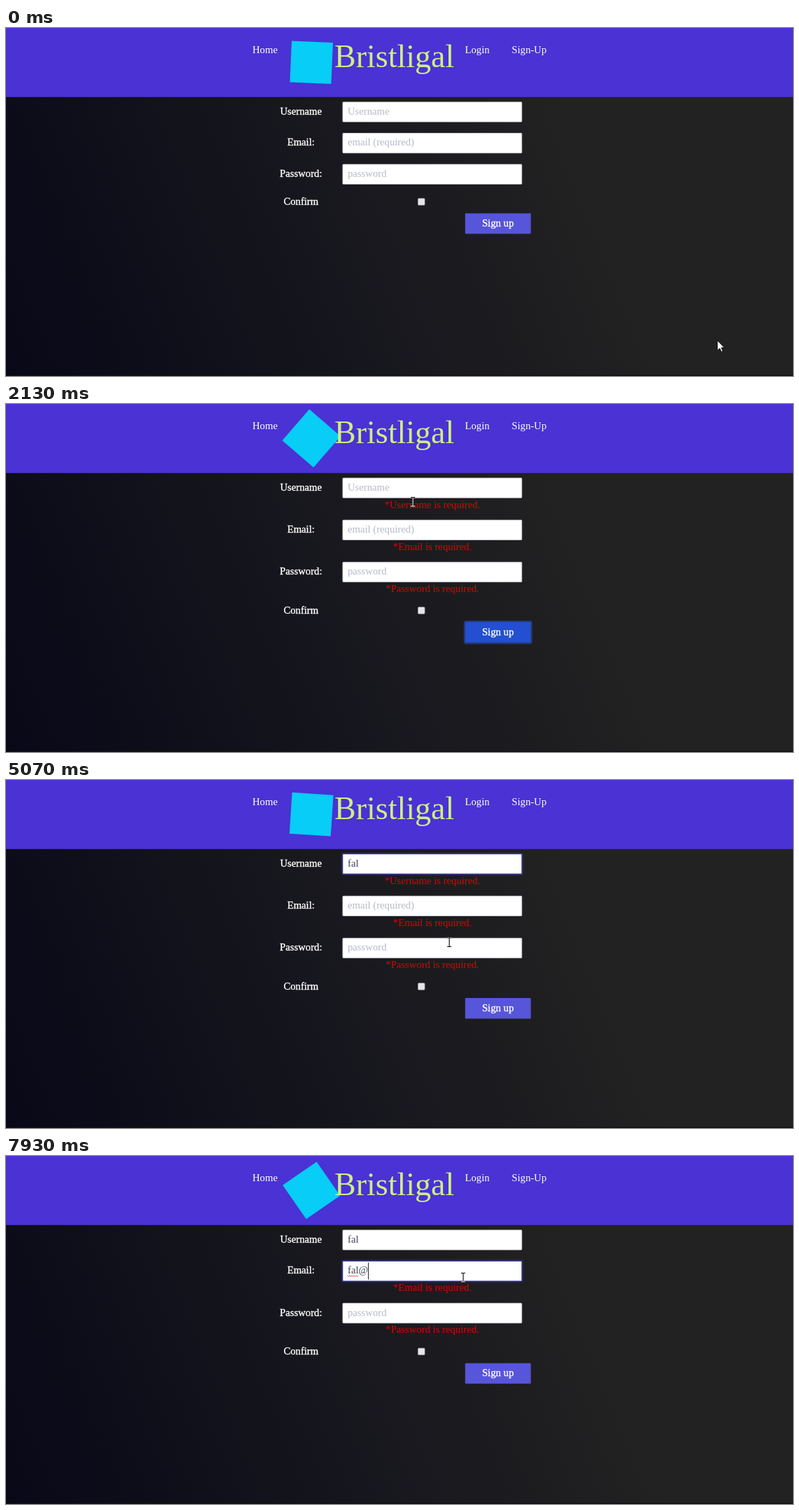
These frames come from a looping animation (1124x498 px, 8 s). An HTML page:

```html
<!DOCTYPE html>
<html lang="en">
<head>
<meta charset="utf-8">
<title>Sign-up form</title>
<style>
  html, body { margin: 0; width: 100%; height: 100%; overflow: hidden; background: #222; }
  .page {
    position: fixed; left: 0; top: 0; width: 1124px; height: 498px; isolation: isolate;
    background: linear-gradient(68deg, #080818 0%, #222 72%);
  }
  svg { position: absolute; left: 0; top: 0; display: block; }
  text { font: 14.7px "Liberation Serif", "Times New Roman", serif; fill: #fff; white-space: pre; }
  .brand { font-size: 46px; fill: #cdee84; }
  .mid { text-anchor: middle; }
  .strong { stroke: #fff; stroke-width: .35px; }
  .error { fill: #e20000; }
  .hint { fill: #b6b9ca; }
  .typed { fill: #3b4351; }
  .beam { mix-blend-mode: difference; }
</style>
</head>
<body>
<div class="page">
  <svg id="stage" width="1124" height="498" viewBox="0 0 1124 498"></svg>
</div>
<script>
const LOOP = 8000, STEP = 1000 / 15;
const ERROR_H = 15.6, ROW_H = 44.6;
const CLICK = { first: 1130, user: 2200, second: 5500, email: 6500 };

const stage = document.getElementById('stage');

function add(parent, tag, attrs, text) {
  const el = document.createElementNS('http://www.w3.org/2000/svg', tag);
  for (const key in attrs) el.setAttribute(key, attrs[key]);
  if (text) el.textContent = text;
  parent.appendChild(el);
  return el;
}
const show = (el, on) => el.setAttribute('visibility', on ? 'visible' : 'hidden');
const place = (el, x, y) => el.setAttribute('transform', `translate(${x} ${y})`);

// Header
add(stage, 'rect', { y: 496.5, width: 1124, height: 1.5, fill: '#101014' });
add(stage, 'rect', { width: 1124, height: 98.8, fill: '#4a32d4' });
const emblem = add(stage, 'rect', { x: -29.5, y: -29.5, width: 59, height: 59, fill: '#08cdf6' });
add(stage, 'text', { x: 469, y: 56, class: 'brand' }, 'Bristligal');
[['Home', 352], ['Login', 655.5], ['Sign-Up', 722.3]].forEach(([label, x]) =>
  add(stage, 'text', { x, y: 35.5 }, label));

// Form rows
function makeField(label, hint, error) {
  const g = add(stage, 'g', {});
  add(g, 'text', { x: 421.3, y: 18.8, class: 'mid strong' }, label);
  const ring = add(g, 'rect', {
    x: 479.8, y: -.2, width: 258, height: 30.6, rx: 2,
    fill: 'none', stroke: '#4340c8', 'stroke-opacity': .4, 'stroke-width': 1.6
  });
  const box = add(g, 'rect', {
    x: 480.9, y: .9, width: 255.8, height: 28.4, rx: 1, fill: '#fff', 'stroke-width': .8
  });
  return {
    g, ring, box,
    hint: add(g, 'text', { x: 488, y: 18.8, class: 'hint' }, hint),
    typed: add(g, 'text', { x: 488, y: 18.8, class: 'typed' }),
    error: add(g, 'text', { x: 609, y: 43.6, class: 'mid error' }, error),
    caret: add(g, 'rect', { y: 3, width: 1, height: 24, fill: '#222' })
  };
}
const fields = [
  makeField('Username', 'Username', '*Username is required.'),
  makeField('Email:', 'email (required)', '*Email is required.'),
  makeField('Password:', 'password', '*Password is required.')
];

let zigzag = 'M488 21.5';
for (let i = 1; i <= 10; i++) zigzag += `L${488 + i * 1.5} ${i % 2 ? 23 : 21.5}`;
const squiggle = add(fields[1].g, 'path', { d: zigzag, fill: 'none', stroke: '#e02020', 'stroke-width': .9 });

// Confirm row and button, relative to the button's top edge
const foot = add(stage, 'g', {});
add(foot, 'text', { x: 421.3, y: -12.4, class: 'mid strong' }, 'Confirm');
add(foot, 'rect', { x: 588.5, y: -21.3, width: 9.5, height: 9.5, rx: 1, fill: '#e6e6e6', stroke: '#aaa', 'stroke-width': .8 });
const buttonRing = add(foot, 'rect', {
  x: 654.8, y: -.9, width: 95.8, height: 31.3, rx: 2.5,
  fill: 'none', stroke: '#233c76', 'stroke-width': 2
});
const button = add(foot, 'rect', { x: 655.8, y: .1, width: 93.8, height: 29.3, rx: 1 });
add(foot, 'text', { x: 702.6, y: 19.1, class: 'mid strong' }, 'Sign up');

// Pointers
const outlined = { fill: '#fff', stroke: '#000', 'stroke-width': .9, 'stroke-linejoin': 'round' };
const pointers = {
  arrow: add(stage, 'path', { d: 'M0 0V14.5L3.4 11.4L5.6 16.4L7.9 15.4L5.7 10.6H10Z', ...outlined }),
  hand: add(stage, 'path', {
    d: 'M-1.6 1.4Q0-1.2 1.6 1.4V6.2Q3.4 5.2 4.2 6.8Q5.9 6.1 6.5 7.6Q8.2 7.2 8.2 9.2V13.5' +
       'Q7.8 18.8 3.8 18.8H1.2Q-1.4 18.6-3.4 14.8L-5.6 11.2Q-5.6 9.4-3.6 9.8L-1.6 11.6Z', ...outlined
  }),
  beam: add(stage, 'path', {
    d: 'M-3 .5H-1Q0 .5 0 1.5Q0 .5 1 .5H3M0 1V12.5M-3 13H-1Q0 13 0 12Q0 13 1 13H3',
    fill: 'none', stroke: '#fff', 'stroke-width': 1.1, class: 'beam'
  })
};

// Pointer stops: time, x, y
const route = [
  [130, 1016, 447], [900, 709, 285], [1800, 709, 285], [2140, 581, 133],
  [4750, 581, 133], [5390, 687, 321], [6150, 687, 321], [6450, 653, 167]
];
function pointerAt(t) {
  const next = route.findIndex(stop => stop[0] > t);
  if (next === 0) return route[0].slice(1);
  if (next < 0) return route[route.length - 1].slice(1);
  const [t0, x0, y0] = route[next - 1], [t1, x1, y1] = route[next];
  const k = (1 - Math.cos(Math.PI * (t - t0) / (t1 - t0))) / 2;
  return [x0 + (x1 - x0) * k, y0 + (y1 - y0) * k];
}

const userKeys = [3800, 4000, 4450];
const emailKeys = [7400, 7530, 7660, 7860];
const typedAt = (word, keys, t) => word.slice(0, keys.filter(k => k <= t).length);

// The caret restarts its blink on focus and on every key
function caretOn(t, since, keys) {
  const last = Math.max(since, ...keys.filter(k => k <= t));
  return (t - last) % 1000 < 500;
}

function draw(t) {
  emblem.setAttribute('transform', `translate(436.2 49.2) rotate(${2.5 + t * .018})`);

  const sent = t >= CLICK.first;
  const errors = [sent && t < CLICK.second, sent, sent];
  const values = [typedAt('fal', userKeys, t), typedAt('fal@', emailKeys, t), ''];
  const focus = t >= CLICK.email ? 1 : t >= CLICK.second ? 'button'
    : t >= CLICK.user ? 0 : sent ? 'button' : null;
  const blink = focus === 0 ? caretOn(t, CLICK.user, userKeys) : caretOn(t, CLICK.email, emailKeys);
  const [px, py] = pointerAt(t);
  let kind = 'arrow', y = 105;

  fields.forEach((f, i) => {
    place(f.g, 0, y);
    f.typed.textContent = values[i];
    show(f.hint, !values[i]);
    show(f.error, errors[i]);
    show(f.ring, focus === i);
    f.box.setAttribute('stroke', focus === i ? '#3a37b8' : '#c4c8d2');
    show(f.caret, focus === i && blink);
    f.caret.setAttribute('x', 488 + (values[i] ? f.typed.getComputedTextLength() : 0));
    if (px > 480 && px < 737 && py >= y && py <= y + 30) kind = 'beam';
    y += ROW_H + (errors[i] ? ERROR_H : 0);
  });
  show(squiggle, values[1].length > 3);

  const top = y + 26.4;
  place(foot, 0, top);
  const hover = px > 655 && px < 750 && py >= top && py <= top + 30;
  if (hover) kind = 'hand';
  show(buttonRing, focus === 'button');
  button.setAttribute('fill', focus === 'button' ? (hover ? '#2a4dd3' : '#234fd0') : hover ? '#4b48d6' : '#5755d9');

  for (const name in pointers) {
    show(pointers[name], name === kind);
    place(pointers[name], px, py);
  }
}

const start = performance.now();
function tick() {
  const t = (performance.now() - start) % LOOP;
  draw(Math.floor((t + 3.4) / STEP) * STEP % LOOP);
  requestAnimationFrame(tick);
}
tick();
</script>
</body>
</html>
```
